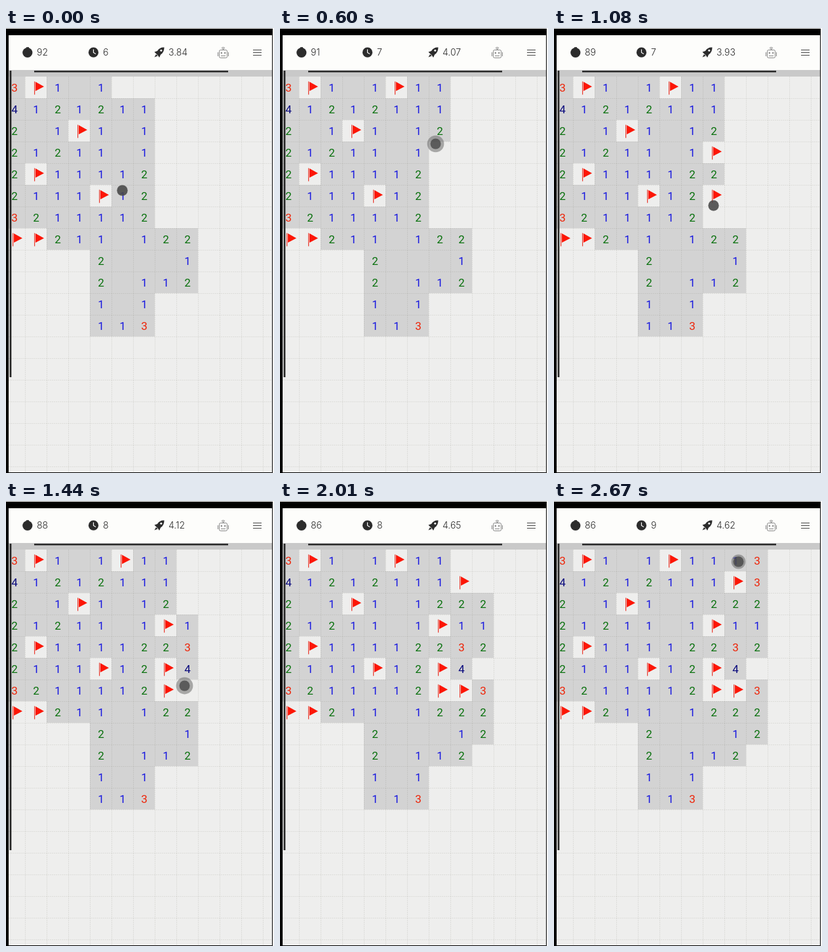
An HTML page with a canvas that plays this animation: 409x678 px, repeating every 2700 ms.

```html
<!DOCTYPE html>
<html lang="en">
<head>
<meta charset="utf-8">
<title>Minefield</title>
<style>
html, body { margin: 0; width: 100%; height: 100%; overflow: hidden; background: #fff; }
canvas { display: block; }
</style>
</head>
<body>
<canvas id="stage" width="409" height="678"></canvas>
<script>
const ctx = document.getElementById('stage').getContext('2d');
const LOOP = 2700, CELL = 33, LEFT = -4, TOP = 74;
const COLS = 10, ROWS = 12;
const PRESS = 110, ACT = 77;
const INK = '#2c2c2c';
const DIGIT_COLORS = ['', '#1515df', '#08700c', '#ee2408', '#08087c'];

// Columns of the mines in each row; -1 lies just outside the view.
const MINES = [
  [-1, 1, 5, 10], [-1, 8, 10], [-1, 3], [7], [1, 10], [-1, 4, 7, 9],
  [7, 8], [0, 1, 10], [3], [3, 9], [7], [], [5, 7]
];

// Areas already cleared: first column and row, last column and row.
const CLEARED = [[0, 0, 4, 0], [0, 1, 6, 7], [4, 7, 8, 9], [4, 10, 6, 11]];

// Finger presses: start time, cell, offset from the cell centre.
const PRESSES = [
  [-97, 5, 5, 0, -8], [190, 5, 0], [390, 6, 1], [553, 7, 3, -6, -13],
  [770, 6, 3], [982, 7, 5, 0, 15], [1110, 7, 6], [1255, 7, 4],
  [1380, 8, 6, -4, -7], [1545, 8, 7], [1690, 8, 3, 0, 22], [1900, 8, 1],
  [2060, 8, 2], [2215, 7, 1, 9, -15], [2588, 8, 0, 5, 2]
];

const isMine = (col, row) => Boolean(MINES[row]?.includes(col));

function forArea(c0, r0, c1, r1, visit) {
  for (let row = r0; row <= r1; row++)
    for (let col = c0; col <= c1; col++) visit(col, row);
}

function forNeighbours(col, row, visit) {
  forArea(col - 1, row - 1, col + 1, row + 1, visit);
}

function countMines(col, row) {
  let count = 0;
  forNeighbours(col, row, (c, r) => { count += isMine(c, r); });
  return count;
}

// Pressing a mine flags it; pressing a number opens its safe neighbours.
function stateAt(t) {
  const known = Array.from({ length: ROWS }, () => Array(COLS).fill(false));
  let mines = 92, opened = 25;
  for (const area of CLEARED) forArea(...area, (c, r) => { known[r][c] = true; });
  for (const [start, col, row] of PRESSES) {
    if (start + ACT > t) break;
    if (isMine(col, row)) {
      known[row][col] = true;
      mines--;
      continue;
    }
    forNeighbours(col, row, (c, r) => {
      if (!known[r] || known[r][c] || isMine(c, r)) return;
      known[r][c] = true;
      opened++;
    });
  }
  return { known, mines, opened };
}

function rect(x, y, w, h, color) {
  ctx.fillStyle = color;
  ctx.fillRect(x, y, w, h);
}

function disc(x, y, r, color) {
  ctx.fillStyle = color;
  ctx.beginPath();
  ctx.arc(x, y, r, 0, Math.PI * 2);
  ctx.fill();
}

function stroke(path, color, width = 1) {
  ctx.strokeStyle = color;
  ctx.lineWidth = width;
  ctx.stroke(new Path2D(path));
}

function fillPath(path, color) {
  ctx.fillStyle = color;
  ctx.fill(new Path2D(path));
}

function forKnown(known, visit) {
  forArea(0, 0, COLS - 1, ROWS - 1, (col, row) => {
    if (known[row][col]) visit(col, row, LEFT + col * CELL, TOP + row * CELL);
  });
}

function drawGrid() {
  const color = 'rgba(70,70,50,.1)';
  ctx.save();
  ctx.setLineDash([2, 1]);
  for (let x = LEFT + CELL; x < 406; x += CELL) stroke(`M${x + .5} ${TOP}V677`, color);
  for (let y = TOP + CELL; y < 677; y += CELL) stroke(`M4 ${y + .5}H406`, color);
  ctx.restore();
}

function drawFlag(x, y) {
  rect(x - 2, y - 9.5, 1.2, 20, '#e8382c');
  fillPath(`M${x} ${y - 9}l13 7.2l-13 6.8Z`, '#fc1606');
}

function drawBoard(known) {
  rect(4, TOP, 402, 604, '#eeeeed');
  forKnown(known, (col, row, x, y) => {
    if (!isMine(col, row)) rect(x, y, CELL, CELL, '#d3d3d3');
  });
  drawGrid();
  ctx.font = '17px Roboto, sans-serif';
  ctx.textAlign = 'center';
  forKnown(known, (col, row, x, y) => {
    if (isMine(col, row)) {
      drawFlag(x + 16, y + 17);
      return;
    }
    const count = countMines(col, row);
    if (!count) return;
    ctx.fillStyle = DIGIT_COLORS[count];
    ctx.fillText(count, x + 17, y + 23);
  });
}

function drawIcons() {
  disc(32.8, 37.5, 7.6, INK);
  rect(31, 29.2, 4, 2, INK);

  disc(133.5, 37.2, 7.6, INK);
  stroke('M133.5 32.5V37.5L137 39.5', '#fff', 1.2);

  fillPath('M241.5 29.5Q234.5 29 231 35L226.5 36.5L229 39L232 42L234 45L236 40.5Q241.5 37 241.5 29.5Z', INK);
  fillPath('M229 40L226.5 44.5L231.5 42.5Z', INK);
  disc(236.8, 34.2, 1.5, '#fff');

  const grey = '#858585';
  ctx.strokeStyle = grey;
  ctx.lineWidth = 1;
  ctx.beginPath();
  ctx.roundRect(325.5, 33.5, 12, 12, 2);
  ctx.roundRect(329.5, 29.5, 4, 2, 1);
  ctx.stroke();
  stroke('M331.5 32V33.5M323.5 37V43M339.5 37V43M328 42.5H335', grey);
  disc(328.8, 38, 1.2, grey);
  disc(334.2, 38, 1.2, grey);

  stroke('M377 33.5H390M377 37.5H390M377 41.5H390', '#444');
}

function drawHeader(mines, seconds, rate) {
  rect(4, 11, 402, 53, '#fdfdfb');
  rect(4, 64, 402, 10, '#c9c9c9');
  drawIcons();
  ctx.font = '300 14px Inter, sans-serif';
  ctx.textAlign = 'left';
  ctx.fillStyle = '#2c2c2c';
  ctx.fillText(mines, 47, 42);
  ctx.fillText(seconds, 148, 42);
  ctx.fillText(rate, 248, 42);
}

function drawFrame() {
  rect(43, 65, 296, 2.5, '#2a2a2a');
  rect(5.5, 65, 2.8, 467, '#2a2a2a');
  rect(0, 1, 407, 10, '#000');
  rect(0, 1, 4, 677, '#000');
  rect(406, 1, 1, 677, '#000');
  rect(0, 677, 407, 1, '#000');
}

function drawTouches(t) {
  for (const [start, col, row, dx = 0, dy = 0] of PRESSES) {
    const progress = (t - start) / PRESS;
    if (progress < 0 || progress >= 1) continue;
    const x = LEFT + (col + .5) * CELL + dx, y = TOP + (row + .5) * CELL + dy;
    disc(x, y, 6 + 7 * Math.sin(Math.PI * progress), 'rgba(95,95,95,.5)');
    disc(x, y, 8, 'rgba(65,65,65,.75)');
  }
}

function render(t) {
  const { known, mines, opened } = stateAt(t);
  const clock = 6.504 + t * 0.0010465;
  rect(0, 0, 409, 678, '#fff');
  drawBoard(known);
  drawHeader(mines, Math.floor(clock), (opened / clock).toFixed(2));
  drawFrame();
  drawTouches(t);
}

const begin = performance.now();
function tick() {
  render((performance.now() - begin) % LOOP);
  requestAnimationFrame(tick);
}
tick();
</script>
</body>
</html>
```
